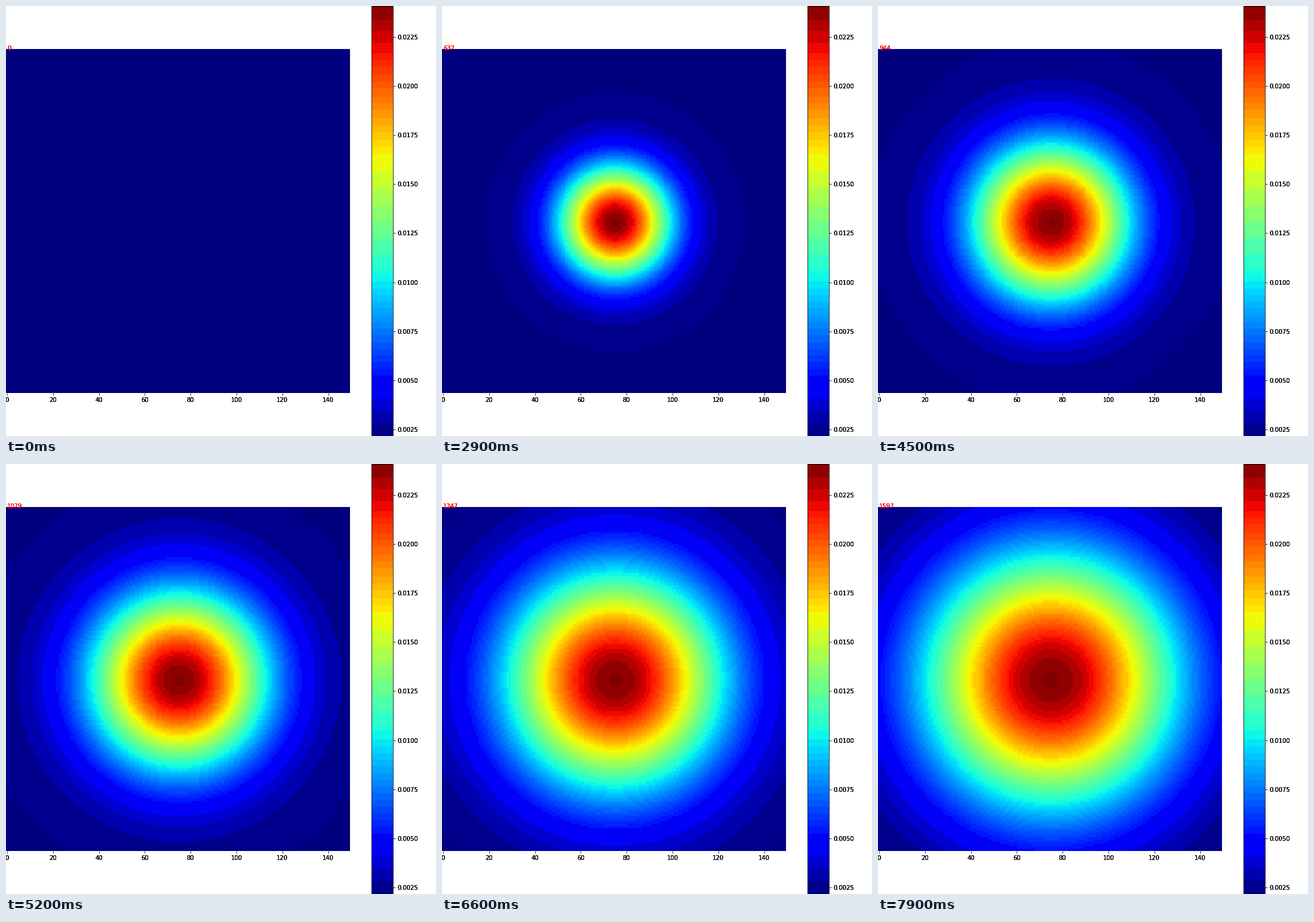
A matplotlib script for the animation above (8000 ms loop, 720 by 720 pixels).

```python
import numpy as np
import matplotlib.pyplot as plt
from matplotlib.animation import FuncAnimation
from matplotlib.cm import ScalarMappable
from matplotlib.colors import ListedColormap, Normalize

SIZE, CELLS, FRAMES = 720, 150, 80
LOW, HIGH = 0.002165, 0.024083
PASSES = 3  # text is painted repeatedly for heavier strokes

plt.rcParams.update({"font.family": "DejaVu Sans", "font.size": 10})


def banded_jet():
    """Jet reduced to 3-4-3 bits per channel, each band in its mean colour."""
    rgb = plt.get_cmap("jet")(np.arange(256), bytes=True)[:, :3].astype(int)
    keys = (rgb[:, 0] >> 5) * 128 + (rgb[:, 1] >> 4) * 8 + (rgb[:, 2] >> 5)
    weight = 1 / (np.arange(256) + 1.0)
    out = np.empty((256, 3))
    for key in np.unique(keys):
        band = keys == key
        out[band] = np.average(rgb[band], axis=0, weights=weight[band]) / 255
    return ListedColormap(np.clip(out, 0, 1))


def label(x, y, text, **style):
    """Text at pixel position x, y, measured from the top left."""
    for _ in range(PASSES):
        fig.text(x / SIZE, 1 - y / SIZE, text, **style)


def distance(i):
    return int(81.3 + 19.19 * i) if i else 0


def beam(z):
    """Intensity of a widening Gaussian beam, scaled to 0..1."""
    if z == 0:
        return np.zeros((CELLS, CELLS))
    spread = 113.6 + 0.001145 * z * z
    field = np.exp(-r2 / spread)
    return (field - field.min()) / (field.max() - field.min())


offset = np.arange(CELLS) - CELLS // 2
r2 = offset[:, None] ** 2 + offset[None, :] ** 2

fig = plt.figure(figsize=(10, 10), dpi=72, facecolor="white")
cmap = banded_jet()

ax = fig.add_axes([0, 0.1, 0.8, 0.8])
image = ax.imshow(beam(0), cmap=cmap, vmin=0, vmax=1, interpolation="nearest")
ax.set_frame_on(False)
ax.set_yticks([])
ax.set_xticks(range(0, CELLS, 20))
ax.tick_params(labelbottom=False)
for tick in range(0, CELLS, 20):
    label((tick + 0.5) * 576 / CELLS, 655, str(tick), ha="center", va="top")
counters = [ax.text(0, 0, "0", color="red") for _ in range(PASSES)]

cax = fig.add_axes([0.85, 0, 0.05, 1])
bar = fig.colorbar(ScalarMappable(Normalize(LOW, HIGH), cmap), cax=cax)
values = np.arange(0.0025, 0.023, 0.0025)
bar.set_ticks(values)
cax.tick_params(labelright=False)
for v in values:
    y = SIZE * (HIGH - v) / (HIGH - LOW)
    label(655, y, f"{v:.4f}", ha="left", va="center_baseline")


def update(i):
    z = distance(i)
    image.set_data(beam(z))
    for text in counters:
        text.set_text(str(z))
    return [image, *counters]


anim = FuncAnimation(fig, update, frames=FRAMES, interval=100, repeat=True,
                     repeat_delay=0, blit=False)
plt.show()
```
